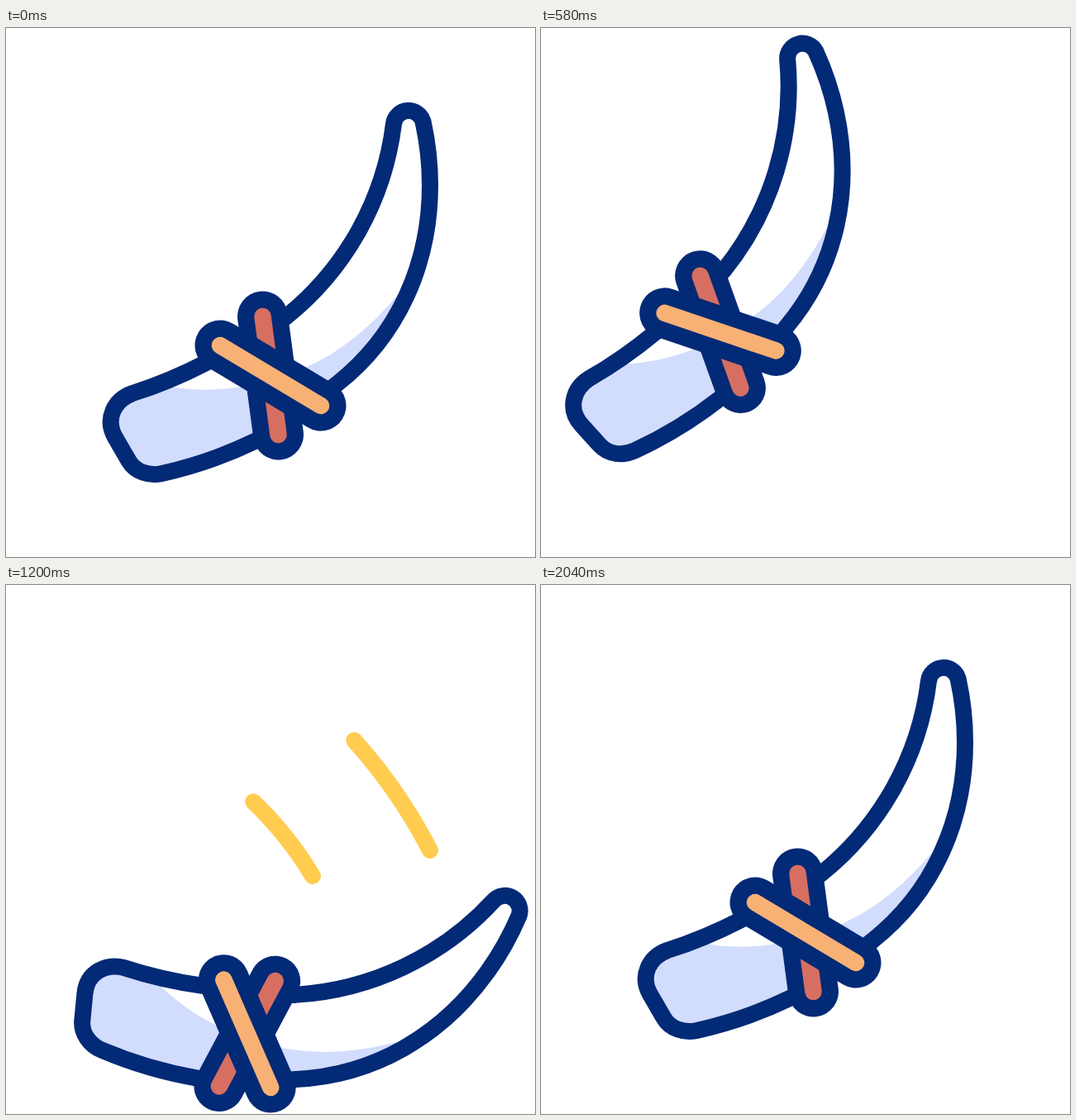
Recreate the animation shown at these times as an HTML page. Size 640x640 px, loop 2.4 s.

```html
<!DOCTYPE html>
<html lang="en">
<head>
<meta charset="utf-8">
<title>Swinging knife</title>
<style>
  html, body { margin: 0; width: 100%; height: 100%; overflow: hidden; background: #fff; }
  svg { display: block; width: 100vw; height: 100vh; }
  path { fill: none; stroke-linecap: round; stroke-linejoin: round; }
  .streak { stroke: #ffcc50; stroke-width: 20; }
  .edge { stroke: #032a76; stroke-width: 20; }
  .wrap { stroke: #032a76; stroke-width: 61; }
  .red { stroke: #d66f61; stroke-width: 20.5; }
  .orange { stroke: #f7b175; stroke-width: 20.5; }
</style>
</head>
<body>
<svg viewBox="0 0 640 640">
  <defs>
    <path id="body" d="M504.5 113 C510 138 513 165 513 190 C513 286 474 373 400 431
      C370 456 338 482 303 499 C268 516 229 530 188.7 538.9 C173.2 542.4 156.4 537.3 148.4 523.5
      L132.3 495.7 C119 473 131 450 153 442 C185 432 215 419 244 404
      C280 388 312 370 340 348.5 A355 355 0 0 0 469 116 A18.2 18.2 0 0 1 504.5 113 Z"/>
    <clipPath id="inside"><use href="#body"/></clipPath>
  </defs>
  <path class="streak" pathLength="1" d="M205 197 C268 226 328 281 371 352"/>
  <path class="streak" pathLength="1" d="M300 81 C390 145 462 222 513 321"/>
  <g id="knife">
    <use href="#body" style="fill:#fff"/>
    <path clip-path="url(#inside)" style="fill:#d2dcfd" d="M100 420 L188 432
      C225 440 262 439 295 432 C320 426 340 419 362 411
      C402 393 436 367 472 325 L560 325 L560 580 L100 580 Z"/>
    <use href="#body" class="edge"/>
    <path class="wrap" d="M310.5 349 L329.5 492"/>
    <path class="red" d="M310.5 349 L329.5 492"/>
    <path class="wrap" d="M259 384 L381 457"/>
    <path class="orange" d="M259 384 L381 457"/>
  </g>
</svg>
<script>
const LOOP = 2400, STEP = 20;
const knife = document.getElementById('knife');
const streaks = document.querySelectorAll('.streak');

// Each row: end time, end value, and the two time handles of the easing.
const TURN = [[690, -12.65, .54, .46], [1210, 35.6, .563, .611], [2045, 0, .453, .476]];
const SLIDE = [[725, -127, .441, .562], [1210, 70.5, .625, .571], [2045, 0, .454, .548]];

const clamp = x => Math.min(1, Math.max(0, x));
const smooth = s => s * s * (3 - 2 * s);
const ramp = (t, from, to) => smooth(clamp((t - from) / (to - from)));

// Solves cubic-bezier(x1, 0, x2, 1) by bisection.
function ease(x, x1, x2) {
  let lo = 0, hi = 1;
  for (let i = 0; i < 24; i++) {
    const s = (lo + hi) / 2, r = 1 - s;
    if (3 * s * r * r * x1 + 3 * s * s * r * x2 + s * s * s < x) lo = s; else hi = s;
  }
  return smooth(lo);
}

function valueAt(track, t) {
  let from = 0, value = 0;
  for (const [end, next, x1, x2] of track) {
    if (t < end) return value + (next - value) * ease((t - from) / (end - from), x1, x2);
    from = end;
    value = next;
  }
  return value;
}

function draw(t) {
  const lift = -2.5 * Math.sin(Math.PI * clamp((t - 700) / 400));
  knife.setAttribute('transform',
    `translate(${valueAt(SLIDE, t)} ${lift}) rotate(${valueAt(TURN, t)} 80 328)`);

  const tail = ramp(t, 1075, 1325), head = ramp(t, 960, 1120);
  for (const s of streaks) {
    s.style.display = head - tail > .002 ? '' : 'none';
    s.style.strokeDasharray = `${head - tail} 3`;
    s.style.strokeDashoffset = -tail;
  }
}

const start = performance.now();
function tick() {
  const t = (performance.now() - start) % LOOP;
  draw(Math.floor(t / STEP) * STEP);
  requestAnimationFrame(tick);
}
draw(0);
requestAnimationFrame(tick);
</script>
</body>
</html>
```
